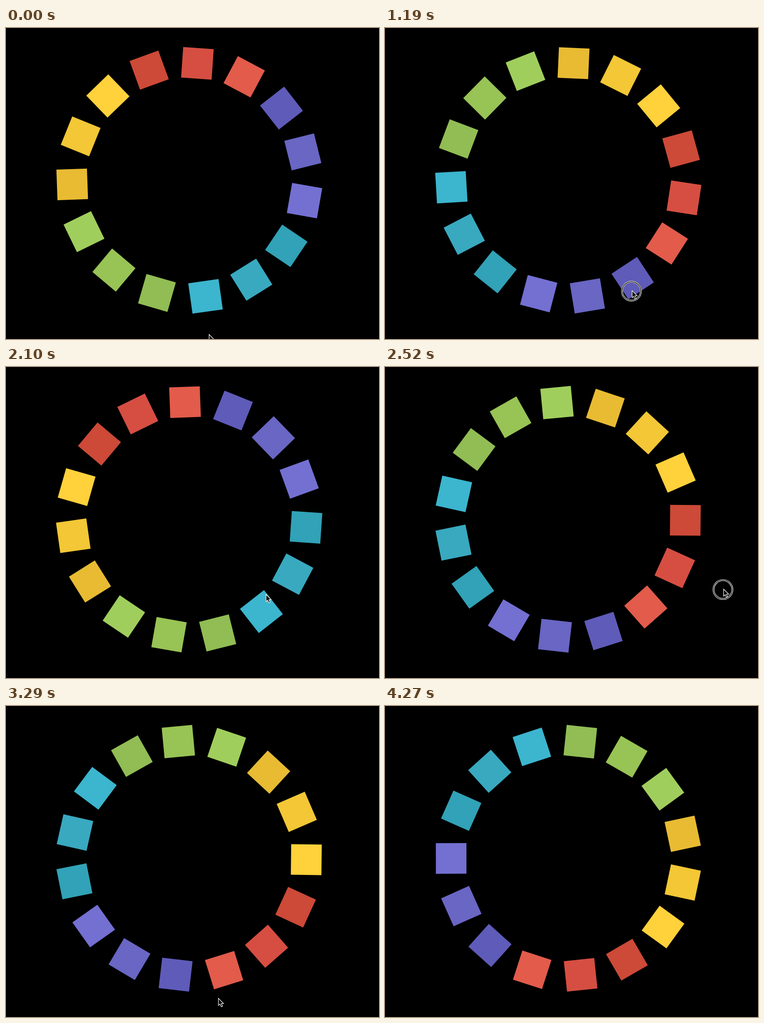
Recreate the animation shown at these times as an HTML page. Size 820x683 px, loop 4340 ms.

```html
<!DOCTYPE html>
<html lang="en">
<head>
<meta charset="utf-8">
<title>Spinning colour wheel</title>
<style>
  html, body { margin: 0; width: 100%; height: 100%; overflow: hidden; background: #000; }
  svg { display: block; width: 100%; height: 100%; }
</style>
</head>
<body>
<svg viewBox="0 0 820 683">
  <rect width="820" height="683" fill="#000"/>
  <g id="wheel"></g>
  <g id="pointer">
    <g id="ring" fill="none" stroke="#fff" stroke-width="1.1">
      <circle cx="-1" cy="1" r="20.7" stroke="#000" stroke-width="4"/>
      <circle cx="-1" cy="1" r="22"/>
      <circle cx="-1" cy="1" r="19.4"/>
    </g>
    <path d="M0.5 0V15.6L4 12.4L6.7 18.4L9.5 17.2L6.9 11.3H11.6Z" fill="#000" stroke="#fff" stroke-width="1.2"/>
  </g>
</svg>
<script>
const LOOP = 4340, STEP = 70;
const CENTER = { x: 402.8, y: 334.4 }, RADIUS = 257.4, SIDE = 67.2;
const REST = 4, FINAL = 894;
const COLORS = [
  '#d64e42', '#e25b4b', '#5f5bb9', '#6966c4', '#7370d2',
  '#31a2b7', '#39a9c0', '#3cb5ce', '#91bd54', '#98c355',
  '#a0ce5d', '#e8bb33', '#f3c735', '#ffd13b', '#cc4a37'
];

// Each stroke turns the wheel with the hand by `sweep` degrees;
// `wheel` and `hand` are the angles on release, `reach` the hand's radius.
const STROKES = [
  { press: 980, release: 1190, wheel: 98.6, hand: 150, reach: 280, sweep: 94.6 },
  { press: 1610, release: 1750, wheel: 154.8, hand: 150.2, reach: 274, sweep: 36 },
  { press: 2380, release: 2520, wheel: 474.5, hand: 114.2, reach: 374, sweep: 54 }
];
const START = { time: 0, x: 446, y: 673 };
const EXIT = [
  { time: 2800, x: 729, y: 444.5 },
  { time: 3290, x: 466.5, y: 642 },
  { time: 3500, x: 455, y: 700 }
];

const mix = (a, b, u) => a + (b - a) * u;
const progress = (stroke, time) => (time - stroke.press) / (stroke.release - stroke.press);
const glide = ms => 1 - Math.exp(-((ms / 395.4) ** 1.357));

function wheelAngle(time) {
  let from = REST, since = 0;
  for (const stroke of STROKES) {
    const grabbed = stroke.wheel - stroke.sweep;
    if (time < stroke.press) return coast(from, grabbed, time - since, stroke.press - since);
    if (time <= stroke.release) return mix(grabbed, stroke.wheel, progress(stroke, time));
    from = stroke.wheel;
    since = stroke.release;
  }
  return coast(from, FINAL, time - since, LOOP - since);
}

function coast(from, to, elapsed, span) {
  return mix(from, to, glide(elapsed) / glide(span));
}

function handAt(stroke, time) {
  const angle = (stroke.hand - stroke.sweep * (1 - progress(stroke, time))) * Math.PI / 180;
  return {
    time,
    x: CENTER.x + stroke.reach * Math.sin(angle),
    y: CENTER.y - stroke.reach * Math.cos(angle)
  };
}

const STOPS = [
  START,
  ...STROKES.flatMap(s => [handAt(s, s.press), handAt(s, s.release)]),
  ...EXIT
];

function pointerAt(time, held) {
  if (held) return handAt(held, time);
  const next = STOPS.findIndex(stop => stop.time > time);
  if (next < 0) return STOPS[STOPS.length - 1];
  const a = STOPS[next - 1], b = STOPS[next];
  const u = ((time - a.time) / (b.time - a.time)) ** 3;
  return { x: mix(a.x, b.x, u), y: mix(a.y, b.y, u) };
}

const wheel = document.getElementById('wheel');
const pointer = document.getElementById('pointer');
const ring = document.getElementById('ring');

COLORS.forEach((fill, i) => {
  const square = document.createElementNS('http://www.w3.org/2000/svg', 'rect');
  const attrs = {
    x: -SIDE / 2, y: -RADIUS - SIDE / 2, width: SIDE, height: SIDE,
    fill, transform: `rotate(${i * 360 / COLORS.length})`
  };
  for (const key in attrs) square.setAttribute(key, attrs[key]);
  wheel.append(square);
});

function draw(time) {
  const held = STROKES.find(s => time >= s.press && time <= s.release);
  const { x, y } = pointerAt(time, held);
  wheel.setAttribute('transform', `translate(${CENTER.x} ${CENTER.y}) rotate(${wheelAngle(time)})`);
  pointer.setAttribute('transform', `translate(${x} ${y})`);
  ring.setAttribute('visibility', held ? 'visible' : 'hidden');
}

const start = performance.now();
function tick() {
  const time = (performance.now() - start) % LOOP;
  draw(Math.floor(time / STEP) * STEP);
  requestAnimationFrame(tick);
}
tick();
</script>
</body>
</html>
```
